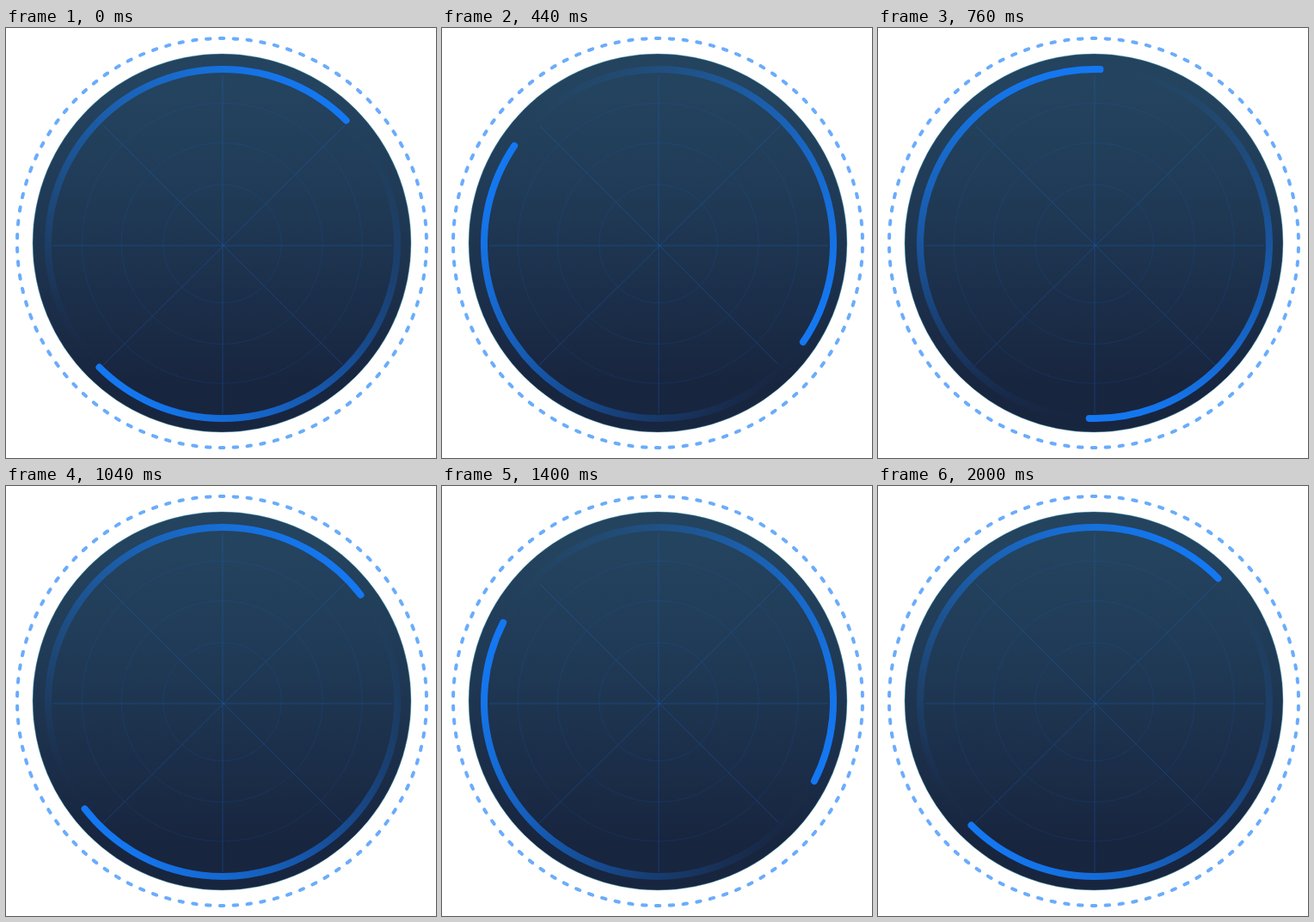
These frames come from a looping animation (500x500 px, 2.04 s). An HTML page:

```html
<!DOCTYPE html>
<html lang="en">
<head>
<meta charset="utf-8">
<title>Radar spinner</title>
<style>
  html, body { margin: 0; width: 100%; height: 100%; overflow: hidden; background: #fff; }
  svg { display: block; width: 100%; height: 100%; }
</style>
</head>
<body>
<svg viewBox="0 0 500 500" fill="none">
  <defs>
    <linearGradient id="night" gradientUnits="userSpaceOnUse" x1="0" y1="30" x2="0" y2="470">
      <stop offset=".1" stop-color="#24435e"/>
      <stop offset=".36" stop-color="#203b57"/>
      <stop offset=".87" stop-color="#18253f"/>
    </linearGradient>
    <linearGradient id="fade" gradientUnits="userSpaceOnUse" x1="203" y1="0" x2="-203" y2="0">
      <stop stop-color="#1478f2"/>
      <stop offset="1" stop-color="#1478f2" stop-opacity="0"/>
    </linearGradient>
    <path id="arc" d="M203 0A203 203 0 0 0 -203 0" stroke="url(#fade)" stroke-width="8" stroke-linecap="round"/>
  </defs>

  <circle cx="251" cy="250" r="238" stroke="#6aacfc" stroke-width="4" stroke-linecap="round"
    pathLength="94" stroke-dasharray=".28 .72" stroke-dashoffset="-.36"/>
  <circle cx="251" cy="250" r="220" fill="url(#night)" stroke="#4fb8cc" stroke-opacity=".5" stroke-width=".8"/>

  <g stroke="#1478f2">
    <g stroke-opacity=".13">
      <circle cx="251.5" cy="250.8" r="68.8"/>
      <circle cx="251.2" cy="250.5" r="117"/>
      <circle cx="251.2" cy="250.2" r="163"/>
    </g>
    <path stroke-opacity=".28" d="M252 55V449M55 253H449M113.5 113.5L391.5 391.5M394 113L113 392"/>
  </g>

  <g id="spinner">
    <use href="#arc"/>
    <use href="#arc" transform="rotate(180)"/>
  </g>
</svg>
<script>
  const LOOP = 2040, STEP = 40, TURN = 2000;
  const spinner = document.getElementById('spinner');
  const start = performance.now();

  function draw() {
    const time = Math.max(0, performance.now() - start) % LOOP;
    const angle = Math.floor(time / STEP) * STEP / TURN * 360 - 45;
    spinner.setAttribute('transform', `translate(252 251) rotate(${angle})`);
    requestAnimationFrame(draw);
  }
  draw();
</script>
</body>
</html>
```
